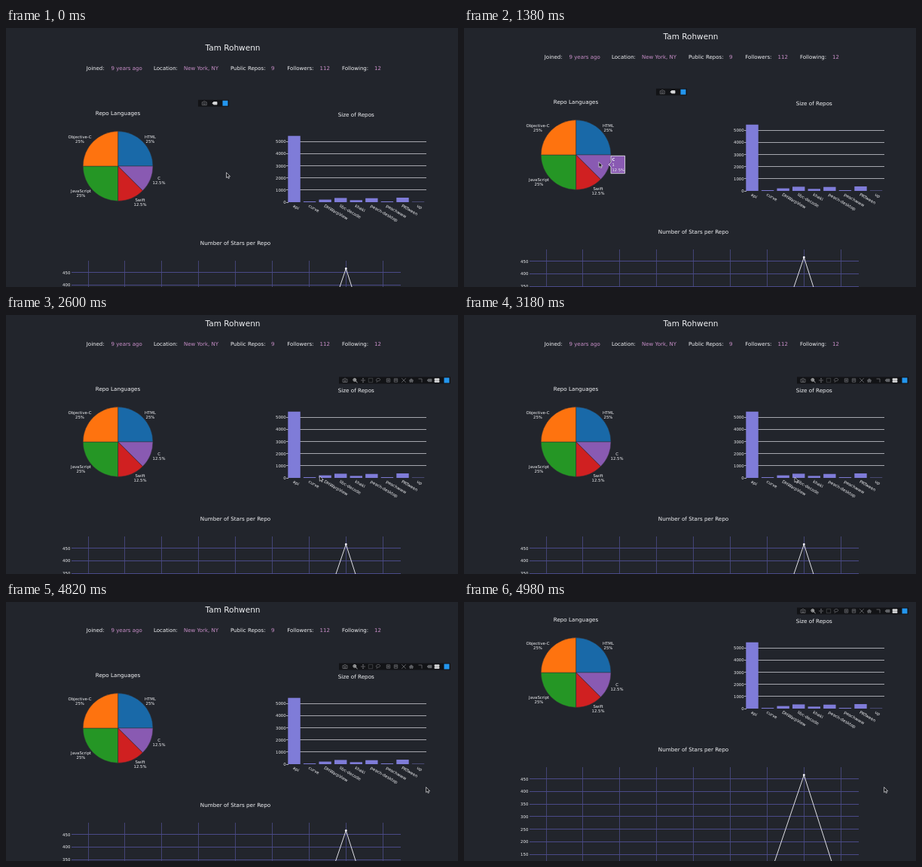
An HTML page for the animation above (5 s loop, 600 by 345 pixels).

```html
<!DOCTYPE html>
<html lang="en">
<head>
<meta charset="utf-8">
<title>Repo dashboard</title>
<style>
html, body { margin: 0; width: 100%; height: 100%; overflow: hidden; background: #22252c; }
svg { display: block; width: 600px; height: 345px; }
text { font-family: "DejaVu Sans", Verdana, sans-serif; fill: #f2f3f6; }
.value { fill: #c98fc9; }
.rule { shape-rendering: crispEdges; fill: none; }
</style>
</head>
<body>
<svg id="stage" viewBox="0 0 600 345"></svg>
<script>
const stage = document.getElementById("stage");

function add(parent, tag, attrs = {}, content) {
  const el = document.createElementNS("http://www.w3.org/2000/svg", tag);
  for (const k in attrs) el.setAttribute(k, attrs[k]);
  if (content !== undefined) el.textContent = content;
  parent.append(el);
  return el;
}
const page = add(stage, "g");
const text = (x, y, s, size, attrs = {}, parent = page) =>
  add(parent, "text", { x, y, "font-size": size, ...attrs }, s);
const middle = { "text-anchor": "middle" }, end = { "text-anchor": "end" };
const rule = (d, stroke) => add(page, "path", { d, stroke, class: "rule" });

// Header
text(301, 30, "Tam Rohwenn", 10.5, middle);
[["Joined:", 106.8, "9 years ago", 139.5], ["Location:", 196, "New York, NY", 236],
 ["Public Repos:", 298, "9", 352], ["Followers:", 373.3, "112", 416.5],
 ["Following:", 446, "12", 489]].forEach(([label, x, value, vx]) => {
  text(x, 56, label, 7);
  text(vx, 56.3, value, 7, { class: "value" });
});

// Pie chart
text(148.5, 116.4, "Repo Languages", 7.2, middle);
const cx = 148.6, cy = 184, radius = 46.4;
const rim = f => {
  const a = f * 2 * Math.PI;
  return `${cx + radius * Math.sin(a)} ${cy - radius * Math.cos(a)}`;
};
let from = 0;
[["HTML", 25, "#1969a8", 191.5, 147], ["C", 12.5, "#895ab2", 203, 202],
 ["Swift", 12.5, "#d02021", 178, 230.8], ["JavaScript", 25, "#259625", 99.5, 218.8],
 ["Objective-C", 25, "#fe730f", 98, 147]].forEach(([name, pct, fill, x, y]) => {
  const to = from + pct / 100;
  add(page, "path", {
    d: `M${cx} ${cy}L${rim(from)}A${radius} ${radius} 0 0 1 ${rim(to)}Z`,
    fill, stroke: "#2c2c32", "stroke-width": .5
  });
  text(x, y, name, 5.35, middle);
  text(x, y + 6.4, pct + "%", 5.35, middle);
  from = to;
});

// Bar chart
text(464.8, 118, "Size of Repos", 7.2, middle);
for (let i = 0; i < 6; i++) {
  const y = 232 - i * 16.2;
  rule(`M372 ${y}H${i ? 558 : 375}`, "#a6a7ae");
  text(371.6, y + 2.1, i * 1000, 5.35, end);
}
[["api", 5450], ["curve", 60], ["DHWarpView", 210], ["libc-decode", 345], ["khaki", 165],
 ["peach-desktop", 325], ["peachwww", 60], ["PRTween", 370], ["up", 25]].forEach(([name, size], i) => {
  const x = 382.5 + i * 20.57, h = size * .0162;
  add(page, "rect", { x: x - 8.2, y: 232 - h, width: 16.4, height: h, fill: "#7f7cd8" });
  text(0, 0, name, 5.5, { transform: `translate(${x - 2} 238) rotate(30)` });
});

// Line chart
text(304.5, 288.6, "Number of Stars per Repo", 7.2, middle);
for (let i = 0; i < 9; i++) rule(`M${109 + i * 48.9} 310V476`, "#434475");
for (let i = 0; i < 10; i++) {
  const y = 325.5 + i * 16.75;
  rule(`M86.5 ${y}H524`, "#4a4a88");
  text(85.3, y + 2, 450 - i * 50, 5.35, end);
}
add(page, "path", {
  d: "M402.4 465L451.3 320.5L500.2 474", stroke: "#f4f4fa", "stroke-width": .9, fill: "none"
});
add(page, "circle", { cx: 451.3, cy: 320.5, r: 1.4, fill: "#f4f4fa" });

// Toolbars: small icons drawn around their own centre
const icons = {
  camera: "M-3-1.5H-1.5L-1-2.5H1L1.5-1.5H3V2.5H-3ZM1.2.5A1.2 1.2 0 1 0-1.2.5A1.2 1.2 0 1 0 1.2.5",
  zoom: "M1.2-.6A1.9 1.9 0 1 0-2.6-.6A1.9 1.9 0 1 0 1.2-.6M.7.8L3 3M-1.7-.6H.3M-.7-1.6V.4",
  pan: "M-3 0H3M0-3V3M-.8-2.2L0-3L.8-2.2M-.8 2.2L0 3L.8 2.2",
  box: "M-2.7-2.7H2.7V2.7H-2.7Z",
  lasso: "M-2 2.8Q-1 1.5-2 .8C-4-1-1-3 1-2.5C4-1.8 3 1.5-1.5 .9",
  plus: "M-2.2-2.2H2.2V2.2H-2.2ZM-1.4 0H1.4M0-1.4V1.4",
  minus: "M-2.2-2.2H2.2V2.2H-2.2ZM-1.4 0H1.4M-1.4-.8H1.4",
  auto: "M-2.8-2.8L2.8 2.8M2.8-2.8L-2.8 2.8",
  home: "M-2.7 .2L0-2.2L2.7 .2H1.9V2.4H.7V.8H-.7V2.4H-1.9V.2Z",
  spike: "M-2.5-2H2V2.6",
  tag: "M-3 0L-1.4-1.7H3V1.7H-1.4Z",
  compare: "M-3-2.2H3V-.5H-3ZM-3 .7H3V2.4H-3Z"
};
const filled = ["home", "tag", "compare"];
const active = ["zoom", "compare"];

function toolbar(x, y, width, names, bright) {
  const bar = add(page, "g", { transform: `translate(${x} ${y})` });
  bar.back = add(bar, "rect", { y: -4.5, width, height: 9, fill: "#121316" });
  names.forEach(([name, ix]) => {
    const color = bright.includes(name) ? "#d6d7d9" : "#626468";
    add(bar, "path", {
      d: icons[name], transform: `translate(${ix} 0)`, stroke: color,
      "stroke-width": name === "box" ? .5 : .9,
      fill: filled.includes(name) ? color : "none"
    });
  });
  add(bar, "rect", { x: width - 8.5, y: -3.5, width: 7, height: 7, fill: "#2396ee" });
  return bar;
}
const allIcons = Object.keys(icons).map((name, i) =>
  [name, [8, 21.5, 32, 42, 52, 65.5, 75.5, 86, 96, 108, 120, 130][i]]);
const pieBar = toolbar(255, 100.2, 41, [["camera", 8.3], ["tag", 22]], ["tag"]);
const sizeBar = toolbar(442, 102, 148, allIcons, active);
const starBar = toolbar(408, 273, 148, allIcons, active);

// Slice tooltip
const tip = add(page, "g");
add(tip, "path", {
  d: "M192 197L195 194V185.3H213.6V208.7H195V200Z",
  fill: "#895ab2", stroke: "#f2f2f6", "stroke-width": .8
});
text(196.5, 192, "C", 5.2, { "font-weight": "bold" }, tip);
text(196.5, 199, "1", 5.2, {}, tip);
text(196.5, 206, "12.5%", 5.2, {}, tip);

const cursor = add(stage, "path", {
  d: "M0 0V7L1.6 5.6L2.7 8L3.9 7.5L2.8 5.2H5Z",
  fill: "#101114", stroke: "#e4e4e8", "stroke-width": .7
});

// Motion: keys are [time, value, value...]
function at(keys, t) {
  let i = 0;
  while (i < keys.length - 2 && t >= keys[i + 1][0]) i++;
  const a = keys[i], b = keys[i + 1];
  const p = Math.min(1, Math.max(0, (t - a[0]) / (b[0] - a[0])));
  return a.slice(1).map((v, k) => v + (b[k + 1] - v) * p * p * (3 - 2 * p));
}
const pointer = [[0, 292.5, 192.5], [80, 292.5, 192.5], [440, 205.5, 253.5], [540, 205.5, 253.5],
  [1050, 179, 178.5], [1550, 179, 178.5], [2080, 332.5, 208], [2120, 333, 208],
  [2800, 438, 216], [3220, 439, 216], [3780, 505, 236], [4320, 544, 246],
  [4600, 557.6, 246.6], [5000, 557.6, 246.6]];
const pieFade = [[0, 1], [340, 1], [560, 0], [720, 0], [960, 1], [2040, 1], [2260, 0], [5000, 0]];
const starFade = [[0, 0], [380, 0], [540, .6], [620, .6], [820, 0], [5000, 0]];
const sizeFade = [[0, 0], [2110, 0], [2400, 1], [5000, 1]];

function scrollAt(t) {
  if (t > 4800) return 15 + 74 * ((t - 4800) / 180) ** 2;
  const p = Math.min(1, Math.max(0, (t - 20) / 320));
  return 15 * (1 - (1 - p) ** 2);
}

function fade(bar, keys, t) {
  bar.setAttribute("opacity", at(keys, t)[0]);
}

function draw() {
  const t = performance.now() % 5000;
  const [x, y] = at(pointer, t);
  page.setAttribute("transform", `translate(0 ${-Math.round(scrollAt(t))})`);
  cursor.setAttribute("transform", `translate(${x} ${y})`);
  fade(pieBar, pieFade, t);
  fade(starBar, starFade, t);
  fade(sizeBar, sizeFade, t);
  pieBar.back.setAttribute("opacity", at(pieFade, t)[0] > .99 ? 1 : 0);

  // The tooltip shows while the pointer is inside the C slice
  const dx = x - cx, dy = y - 169;
  const inside = dy > 0 && dx > dy && Math.hypot(dx, dy) < radius;
  tip.setAttribute("visibility", inside ? "visible" : "hidden");
  requestAnimationFrame(draw);
}
draw();
</script>
</body>
</html>
```
